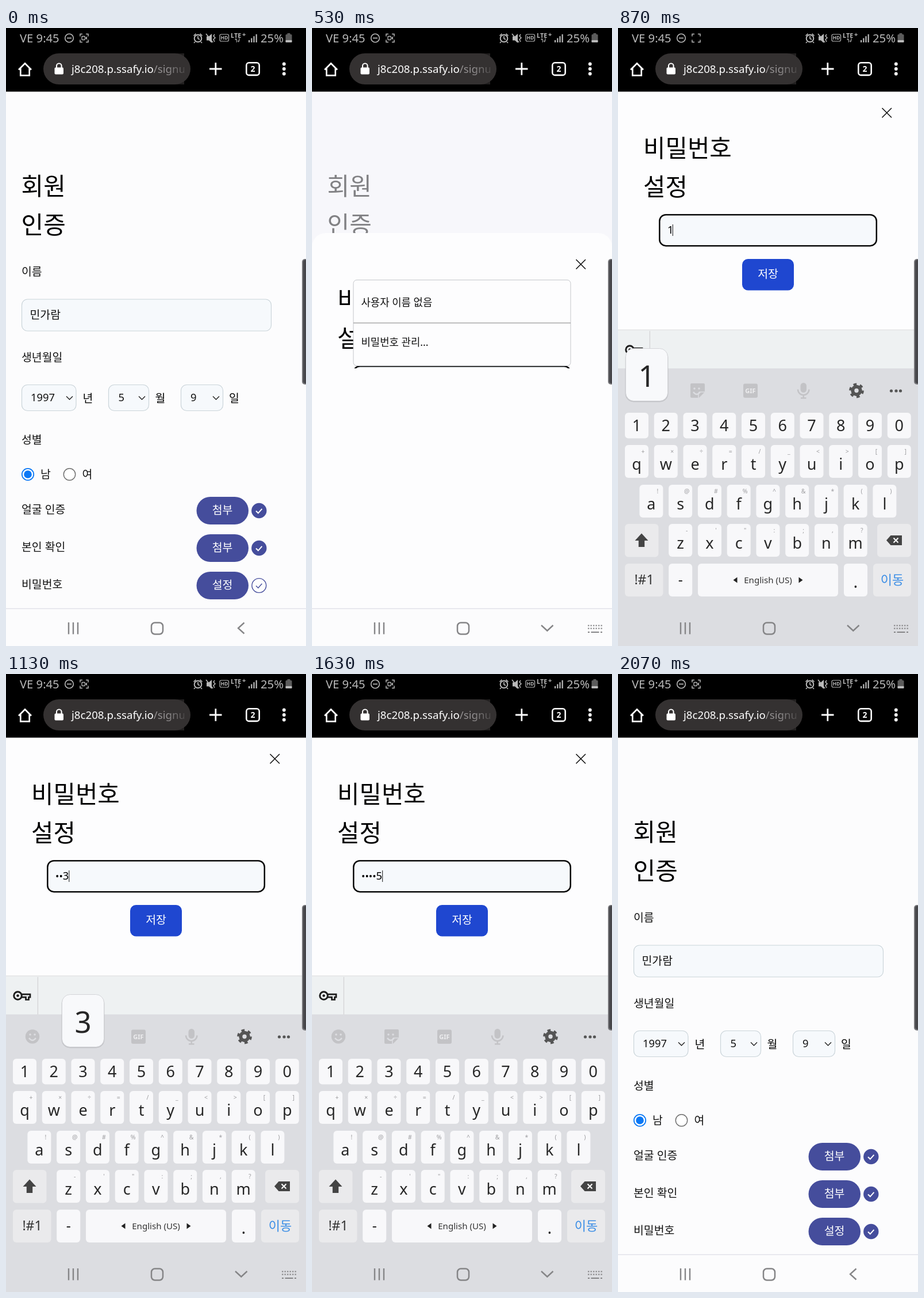
These frames come from a looping animation (522x1073 px, 2.1 s). An HTML page:

```html
<!DOCTYPE html>
<html lang="ko">
<head>
<meta charset="utf-8">
<title>회원 인증</title>
<style>
html, body { margin: 0; width: 100%; height: 100%; overflow: hidden; background: #fcfcfd; }
svg { display: block; width: 100vw; height: 100vh; }
text { font-family: 'Noto Sans', 'Noto Sans CJK KR', 'Noto Sans CJK JP', sans-serif; white-space: pre; }
</style>
</head>
<body>
<svg id="stage" viewBox="0 0 522 1073"></svg>
<script>
const LOOP = 2100, PAGE = '#fcfcfd', INK = '#111', FIELD = '#f6f9fc', EDGE = '#cbd5da';
const INDIGO = '#454d9c', KB = '#dcdde1', KEY = '#f8f8fa', FN = '#eaeaec', FAINT = '#c3c3c6';

const rect = (x, y, w, h, r, fill, more = '') =>
  `<rect x="${x}" y="${y}" width="${w}" height="${h}" rx="${r}" fill="${fill}" ${more}/>`;
const disc = (x, y, r, fill, more = '') =>
  `<circle cx="${x}" cy="${y}" r="${r}" fill="${fill}" ${more}/>`;
const line = (d, color, w, more = '') =>
  `<path d="${d}" fill="none" stroke="${color}" stroke-width="${w}" ${more}/>`;
const fill = (d, color) => `<path d="${d}" fill="${color}"/>`;
const outline = (color, w) => `stroke="${color}" stroke-width="${w}"`;
const MID = 'text-anchor="middle"';
// y is the vertical middle of capitals and syllables
const text = (x, y, s, size, color = INK, more = '') =>
  `<text x="${x}" y="${y + size * 0.365}" font-size="${size}" fill="${color}" ${more}>${s}</text>`;
const group = (id, body, more = '') => `<g id="${id}" ${more}>${body}</g>`;
const esc = c => ({ '<': '&lt;', '>': '&gt;', '&': '&amp;' })[c] || c;

function select(x, w, value, tx, cx, unit, ux) {
  return rect(x + .5, 619.5, w, 45, 10, FIELD, outline(EDGE, 1.2)) +
    text(tx, 641.5, value, 18.4) +
    line(`M${cx - 5.5} 639.5l5.5 5.5 5.5-5.5`, '#222', 1.4) +
    text(ux, 643, unit, 19.4, '#000');
}

const tick = (y, color) => line(`M435 ${y + .5}l3.8 3.8 6.6-7.5`, color, 2);

function action(y, label, button) {
  return text(27, y - 2.5, label, 19.4) +
    rect(331.5, y - 24, 90.5, 48, 24, INDIGO) +
    text(376.5, y - 1, button, 19.4, '#fff', MID);
}

const checked = y => disc(440.3, y, 13.2, INDIGO) + tick(y, '#fff');

function form() {
  return text(26.5, 275, '회원', 42, '#000') + text(26.5, 342, '인증', 42, '#000') +
    text(27, 423, '이름', 19.4) +
    rect(27.5, 471, 434, 55, 10, FIELD, outline(EDGE, 1.2)) +
    text(41.5, 497.5, '민가람', 19.4) +
    text(27, 571.5, '생년월일', 19.4) +
    select(27, 94.5, '1997', 43, 110.5, '년', 133.5) +
    select(178, 70, '5', 195.5, 236.5, '월', 259.5) +
    select(304, 73, '9', 321, 365.5, '일', 388) +
    text(27, 714.5, '성별', 19.4) +
    disc(38, 775, 10.2, '#fff', outline('#0b78f5', 1.8)) + disc(38, 775, 6.8, '#0b78f5') +
    text(60, 774.5, '남', 19.4) +
    disc(110.5, 775, 10.2, '#fff', outline('#707070', 1.5)) +
    text(132.5, 774.5, '여', 19.4) +
    action(838, '얼굴 인증', '첨부') + checked(838) +
    action(903, '본인 확인', '첨부') + checked(903) +
    action(968, '비밀번호', '설정') +
    group('todo', disc(440.3, 968, 12.4, '#fdfdfe', outline(INDIGO, 1.4)) +
      line('M435 968.5l3.8 3.8 6.6-7.5', INDIGO, 1.4)) +
    group('done', checked(968));
}

// drawn with its top edge at 0
function sheet() {
  return rect(0, 0, 522, 1000, 24, '#fdfdfe') +
    line('M459.5 46l16.5 16.5M476 46l-16.5 16.5', '#111', 1.6) +
    text(44, 115.5, '비밀번호', 41.8, '#000', 'font-weight="500"') +
    text(44, 182.5, '설정', 41.8, '#000', 'font-weight="500"') +
    rect(72.3, 231.2, 377.5, 54, 11, FIELD, 'id="box"') +
    '<text id="value" x="86" y="264" font-size="18.4"></text>' +
    rect(0, 248, 1, 20, 0, '#111', 'id="caret"') +
    rect(216, 308, 90, 54.5, 10, '#1f47d0') +
    text(261, 333.5, '저장', 19.4, '#fff', MID);
}

function suggestions() {
  return rect(72, 439, 378, 149, 7, '#000', 'opacity=".1"') +
    rect(72, 437.5, 378, 149, 6, '#fdfdfe', outline('#c4c6ca', 1)) +
    line('M72 512.2H450', '#999', 1.2) +
    text(85.5, 477, '사용자 이름 없음', 17.8) +
    text(85.5, 546, '비밀번호 관리...', 17.8);
}

function keyBar() {
  return rect(0, 523.5, 522, 2, 0, '#000', 'opacity=".1"') + rect(0, 525, 522, 67, 0, '#eef1f2') +
    rect(54.8, 526, 1.2, 65, 0, '#d2d3d4') +
    disc(20.5, 558.5, 6.8, 'none', outline('#1c1c1c', 3)) + disc(20.5, 558.5, 2.3, '#1c1c1c') +
    line('M27 556.2H42V561.2H39.5V565.5H34.5V561.2H27', '#1c1c1c', 2.7);
}

const face = x => disc(x - 4, 626, 1.8, KB) + disc(x + 4, 626, 1.8, KB) +
  line(`M${x - 6} 632q6 8 12 0`, KB, 2.4);

function toolbar() {
  return disc(46, 629.5, 12.2, FAINT) + face(46) +
    fill('M128 617h21a2 2 0 0 1 2 2v13l-10 10h-13a2 2 0 0 1-2-2v-21a2 2 0 0 1 2-2z', FAINT) + face(137) +
    line('M140 643v-8a3 3 0 0 1 3-3h8', KB, 1.6) +
    rect(218, 617.5, 25, 24.5, 3, FAINT) +
    text(230.5, 630, 'GIF', 11, '#eeeef0', MID + ' font-weight="700"') +
    rect(317.5, 616, 10.5, 17, 5.2, FAINT) +
    line('M313 627.5a9.7 9.7 0 0 0 19.4 0M322.7 637v6M318 642.5h9.5', FAINT, 2.4) +
    disc(415, 629.5, 6.7, 'none', outline('#555', 6)) +
    disc(415, 629.5, 10.6, 'none', outline('#555', 4.6) + ' stroke-dasharray="5.4 5.7"') +
    [475.5, 484, 491.5].map(x => disc(x, 630, 2.6, '#555')).join('');
}

const STEP = 50.75;

function keyRow(x0, y, keys, hints) {
  return [...keys].map((c, i) => {
    const x = x0 + i * STEP;
    return rect(x, y, 41, 57, 6, KEY) +
      `<text x="${x + 20.5}" y="${y + 43}" font-size="27" fill="#262626" ${MID}>${c}</text>` +
      text(x + 31.5, y + 11.5, esc(hints[i]), 10.5, '#9c9c9f', MID);
  }).join('');
}

function keyboard() {
  const digits = [...'1234567890'].map((c, i) =>
    rect(12 + i * STEP, 668, 41, 44.5, 6, KEY) +
    text(32.5 + i * STEP, 690, c, 27, '#262626', MID)).join('');
  return rect(0, 591, 522, 482, 0, KB) + toolbar() + digits +
    keyRow(12, 724, 'qwertyuiop', '+×÷=/_<>[]') +
    keyRow(37.4, 793, 'asdfghjkl', '!@#%^&*()') +
    keyRow(88.2, 861, 'zxcvbnm', '-\'":;,?') +
    rect(12, 861, 58.5, 57.5, 6, FN) + fill('M41 877.5 52.5 890H46.2V901H35.8V890H29.5Z', '#444') +
    rect(451, 861, 59, 57.5, 6, FN) + fill('M467 889.5 474.5 881H494V898H474.5Z', '#444') +
    line('M479.5 885.5l8 8M487.5 885.5l-8 8', '#fff', 2) +
    rect(12, 930, 66.5, 57, 6, FN) + text(45.5, 958, '!#1', 23, '#333', MID) +
    rect(88.2, 930, 41, 57, 6, KEY) + text(108.7, 958, '-', 25, '#262626', MID) +
    rect(139, 930, 244, 57, 6, KEY) + text(261, 958.5, 'English (US)', 15.1, '#333', MID) +
    fill('M200.5 958.5l7-5v10zM321.5 958.5l-7-5v10z', '#222') +
    rect(393, 930, 41, 57, 6, KEY) + text(413.5, 961.5, '.', 29, '#262626', MID) +
    rect(444, 930, 66, 57, 6, FN) + text(477, 958, '이동', 22, '#3a8de6', MID);
}

function nav() {
  const c = '#858587';
  return line('M109 1032V1052.5M117 1032V1052.5M125 1032V1052.5', c, 2.4) +
    rect(253, 1032.5, 20, 20, 6, 'none', outline(c, 2.5)) +
    group('back', line('M414.5 1032.5 404 1042 414.5 1051.5', c, 2.4)) +
    group('down', line('M399 1037 409.3 1046.5 419.5 1037', c, 2.4) +
      line('M480 1037.5H505M480 1042.5H505', c, 2.2, 'stroke-dasharray="2.4 2.1"') +
      line('M480 1049H483M485.5 1049H499.5M502 1049H505', c, 2.2));
}

function header() {
  const s = '#b9b9b9';
  const bars = [0, 1, 2, 3].map(i =>
    rect(422 + i * 4.2, 21 - i * 3.4, 2.2, 4 + i * 3.4, 0, s)).join('');
  return rect(0, 0, 522, 110.5, 0, '#000') +
    text(24, 17.5, 'VE 9:45', 20.2, s) +
    disc(110, 17.5, 7.3, 'none', outline(s, 1.6)) + line('M106 17.5h8', s, 1.7) +
    line('M133 10.5h-4v4M139 10.5h4v4M133 24.5h-4v-4M139 24.5h4v-4', s, 1.5) +
    group('cam', rect(132, 14.5, 5.5, 6, 1, 'none', outline(s, 1.3)) + fill('M138 17.5l3-3v6z', s)) +
    disc(334, 18, 6.3, 'none', outline(s, 2)) +
    line('M334 14v4.3l3 1.7M326.5 13.5l4-3.7M341.5 13.5l-4-3.7M329 24l-2 2M339 24l2 2', s, 1.7) +
    fill('M349 14.5h4l5-4.5v16l-5-4.5h-4z', s) + line('M348 10l12 15', s, 1.6) +
    line('M363 11l-2 3 3 3-3 3 2 4', s, 1.5) +
    rect(372, 11, 15.5, 12, 2.5, 'none', outline(s, 1.2)) +
    text(379.8, 17.2, 'HD', 8.5, s, MID + ' font-weight="600"') +
    text(391, 12.8, 'LTE', 10.8, s, 'font-weight="600"') + text(411, 10.5, '+', 11, s, 'font-weight="600"') +
    fill('M398 20l2-2.5 2 2.5v5h-1.4v-4h-1.2zM402.5 22.5l2 2.5 2-2.5v-5h-1.4v4h-1.2z', '#888') +
    bars + text(443, 17.5, '25%', 20.3, s) +
    rect(486.5, 11, 11, 14, 1.5, '#5c5c5c') + rect(489.5, 9, 5, 2.5, 0, '#5c5c5c') +
    rect(486.5, 21, 11, 4, 1, s) +
    line('M22 72.5 33 61.5 44 72.5M25.3 70V82.3H40.7V70', '#fff', 2.7) +
    rect(65, 44, 256, 54, 27, '#343131') +
    rect(84.5, 68.5, 15.5, 12, 2, '#fff') + line('M88 69v-3.2a4.3 4.3 0 0 1 8.6 0v3.2', '#fff', 2.1) +
    `<svg x="100" y="44" width="210" height="54" viewBox="100 44 210 54">` +
    text(114, 71.5, 'j8c208.p.ssafy.io<tspan fill="#939091">/signup</tspan>', 18.7, '#fff') +
    rect(280, 44, 30, 54, 0, 'url(#fade)') + '</svg>' +
    line('M354 71H375.5M364.8 60.3V81.8', '#fff', 2.8) +
    rect(418.3, 60.3, 22.4, 21.6, 4.5, 'none', outline('#fff', 2.6)) +
    text(429.5, 71, '2', 14, '#fff', MID + ' font-weight="700"') +
    [62.5, 71, 79.5].map(y => disc(483.8, y, 2.9, '#fff')).join('');
}

const stage = document.getElementById('stage');
stage.innerHTML =
  `<defs><linearGradient id="fade"><stop stop-color="#343131" stop-opacity="0"/>
  <stop offset="1" stop-color="#343131" stop-opacity=".7"/></linearGradient></defs>` +
  rect(0, 0, 522, 1073, 0, PAGE) + form() +
  rect(0, 110, 522, 898, 0, '#f4f4fa', 'id="scrim"') +
  group('sheet', sheet()) +
  rect(0, 591, 522, 417, 0, '#fdfdfe', 'id="blank"') +
  group('list', suggestions()) +
  group('bar', keyBar()) +
  rect(0, 1008, 522, 65, 0, PAGE) + rect(0, 1007.5, 522, 1.2, 0, '#dcdce6') +
  group('keys', keyboard()) + nav() +
  group('bubble', rect(12.5, 557.5, 75, 92, 15, '#000', 'opacity=".12"') +
    rect(13.5, 556.5, 73, 91, 14, '#f8f9fb', outline('#d4d5d9', 1)) +
    '<text id="big" x="50" y="623" font-size="51" fill="#262626" text-anchor="middle"></text>') +
  header() +
  fill('M522 401h-2a5 5 0 0 0-5 5V614a5 5 0 0 0 5 5h2z', '#77777b') +
  fill('M522 402.5h-1a4 4 0 0 0-4 4V613a4 4 0 0 0 4 4h1z', '#47474b');

const el = {};
stage.querySelectorAll('[id]').forEach(n => el[n.id] = n);

// digit n is held from down to up
const PRESSES = [[840, 910], [970, 1030], [1110, 1200], [1280, 1390], [1500, 1570], [1635, 1740]];
const CAM_OFF = [[200, 340], [600, 900], [1150, 1300]];
const OPEN = 30, FOCUS = 430, RAISE = 600, BAR = 770, SAVE = 1940, CLOSED = 2070;

const ramp = (t, a, b) => Math.min(1, Math.max(0, (t - a) / (b - a)));
const within = (t, a, b) => t >= a && t < b;
const show = (n, on) => n.setAttribute('visibility', on ? 'visible' : 'hidden');
const move = (n, x, y) => n.setAttribute('transform', `translate(${x} ${y})`);

function sheetTop(t) {
  if (t < RAISE) return 1008 - 652 * (1 - (1 - ramp(t, OPEN, 250)) ** 3);
  if (t < SAVE) return 105 - 12 * ramp(t, BAR, 830);
  return 356 + 652 * ramp(t, SAVE, CLOSED) ** 2;
}

function field(t) {
  const n = PRESSES.filter(p => t >= p[0]).length;
  const focused = within(t, FOCUS, SAVE);
  const dots = k => `<tspan font-size="17">${'•'.repeat(k)}</tspan>`;
  const html = n ? dots(n - 1) + n : `<tspan fill="#9aa1ab">${dots(6)}</tspan>`;
  if (el.value.innerHTML !== html) el.value.innerHTML = html;
  el.caret.setAttribute('x', 85.8 + (n - 1) * 6.45 + (n === 1 ? 9 : 10.6));
  show(el.caret, n > 0 && focused);
  el.box.setAttribute('stroke', focused ? '#0a0a0a' : EDGE);
  el.box.setAttribute('stroke-width', focused ? 2.5 : 1.2);
}

function draw(t) {
  const open = within(t, OPEN, CLOSED), typing = within(t, 570, SAVE);
  move(el.sheet, 0, sheetTop(t));
  show(el.sheet, open);
  el.scrim.setAttribute('opacity', .53 * ramp(t, OPEN, 200) * (1 - ramp(t, SAVE, CLOSED)));
  field(t);

  show(el.blank, within(t, 480, RAISE));
  show(el.list, within(t, 490, RAISE));
  el.list.setAttribute('opacity', ramp(t, 490, 525));
  show(el.keys, typing);
  move(el.keys, 0, 482 * (1 - ramp(t, 570, 625)));
  show(el.bar, within(t, BAR, SAVE));
  move(el.bar, 0, 66 * (1 - ramp(t, BAR, 830)));

  const held = PRESSES.findIndex(p => within(t, ...p));
  show(el.bubble, held >= 0);
  if (held >= 0) {
    el.big.textContent = held + 1;
    move(el.bubble, Math.max(0, held * STEP - 17.5), 0);
  }

  const keysNav = within(t, 460, SAVE);
  show(el.back, !keysNav);
  show(el.down, keysNav);
  show(el.todo, t < SAVE);
  show(el.done, t >= SAVE);
  show(el.cam, !CAM_OFF.some(p => within(t, ...p)));
}

const start = performance.now();
function tickFrame() {
  draw((performance.now() - start) % LOOP);
  requestAnimationFrame(tickFrame);
}
tickFrame();
</script>
</body>
</html>
```
